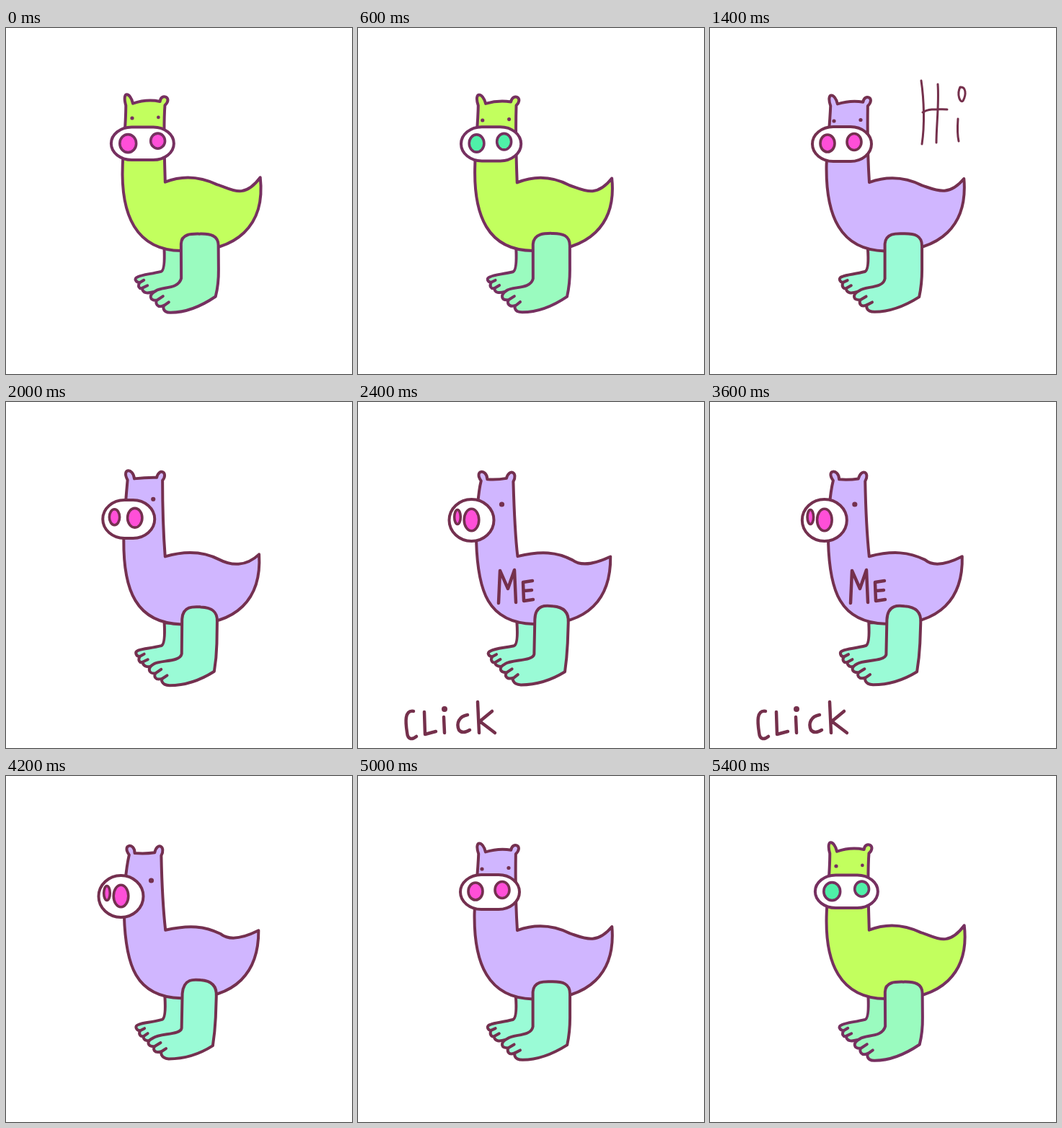
An HTML page that plays this animation: 480 by 480 pixels, repeating every 5.6 s.

```html
<!DOCTYPE html>
<html lang="en">
<head>
<meta charset="utf-8">
<title>Hi, click me</title>
<style>
  html, body { margin: 0; width: 100%; height: 100%; overflow: hidden; background: #fff; }
  svg { display: block; width: 100%; height: 100%; }
  g { fill: none; stroke-linecap: round; stroke-linejoin: round; }
  #bird { stroke-width: 4; }
  .nostril { stroke-width: 3.6; }
  .word { stroke: #75304c; stroke-width: 4.5; }
  .thin { stroke-width: 3; }
  .dot { fill: #75304c; stroke: none; }
</style>
</head>
<body>
<svg viewBox="0 0 480 480">
  <g id="bird">
    <path id="backLeg"/>
    <path id="body"/>
    <path id="frontLeg"/>
    <g id="face">
      <circle class="eye"/><circle class="eye"/>
      <rect id="snout" fill="#fff"/>
      <ellipse class="nostril"/><ellipse class="nostril"/>
    </g>
  </g>
  <g class="word thin" id="h" aria-label="H">
    <path d="M293 73C297 100 298 135 294 161M316 78C318 105 314 135 314 159M295 117C304 111 318 113 329 113"/>
  </g>
  <g class="word thin" id="i" aria-label="i">
    <path d="M344 126C343 140 343 148 345 157M347 82C342 92 347 105 351 101C356 92 355 81 347 82"/>
  </g>
  <g class="word" id="click" aria-label="Click">
    <path d="M77 429C64 427 66 445 68 458C69 470 76 468 81 464M92 430L93 461L108 457M119 437L120 459M152 434C140 436 136 446 140 455C144 460 150 458 155 455M166 416L168 459M186 429L169 443L190 459"/>
    <circle class="dot" cx="120" cy="426" r="4"/>
  </g>
  <g class="word" id="me" aria-label="Me">
    <path d="M195 279L197 234L208 259L217 233L219 278M242 248L229 250L230 276L243 274M230 262L241 261"/>
  </g>
</svg>
<script>
const LOOP = 5600, BEAT = 200;
const GREEN_END = 800, GREEN_START = 5200;
const $ = id => document.getElementById(id);

// Each outline as seen facing the viewer and turned to the side.
const BODY = [
  'M167 108C166 135 163 160 162 190C160 260 180 308 243 309C322 312 358 272 352 209C330 236 312 224 294 218C272 207 248 204 221 214C219 180 218 140 219 108C230 97 214 90 212 103Q195 100 177 105C174 90 160 88 167 108Z',
  'M171 109C166 130 164 160 164 193C166 262 180 306 243 308C322 311 351 270 350 214C334 222 312 230 298 219C276 208 254 206 221 214C217 180 216 145 215 110C222 98 210 91 206 106Q193 108 179 107C179 92 160 94 171 109Z'
];
const FRONT_LEG = [
  'M243 348L243 300C244 283 262 285 270 285C284 285 294 288 294 302L294 335Q294 355 290 373Q258 394 228 394C215 394 217 384 219 384L225 380L219 384C208 389 206 380 209 377L217 372L209 377C199 378 196 370 207 364C215 358 240 362 243 348Z',
  'M244 350L245 302C246 280 262 282 270 283C284 284 293 290 292 306L291 335Q290 355 287 374Q258 392 226 392C213 391 214 382 216 382L222 378L216 382C205 386 203 378 206 375L214 370L206 375C196 376 194 368 204 363C213 357 242 360 244 350Z'
];
const BACK_LEG = 'M219 306Q221 336 215 338C200 342 190 342 183 345C177 347 180 353 185 353L191 350L185 353C182 358 185 362 189 361L196 357L189 361C190 368 196 368 204 366C220 362 240 360 243 352L250 330L246 306Z';

const LOOKS = {
  purple: { skin: '#d0b6ff', leg: '#9afbd6', ink: '#74304f' },
  green: { skin: '#c2ff5e', leg: '#9afbbf', ink: '#763060' }
};
const PINK = '#ff4fd8', TEAL = '#4ff0a8';

const WORDS = { h: [1200, 1800], i: [1400, 1800], click: [2200, 4200], me: [2400, 4200] };

const mix = (a, b, k) => a + (b - a) * k;
const ramp = (t, from, to) => Math.min(1, Math.max(0, (t - from) / (to - from)));
const ease = k => k * k * (3 - 2 * k);
const noise = n => { const s = Math.sin(n * 12.9898) * 43758.5453; return s - Math.floor(s) - .5; };

// Blends two outlines; equal coordinates wobble alike, so shared points stay joined.
function outline([a, b], k, seed) {
  const goal = b.match(/[\d.]+/g);
  let n = 0;
  return a.replace(/[\d.]+/g, v => (mix(+v, +goal[n++], k) + noise(+v + seed)).toFixed(2));
}

function set(el, attrs) {
  for (const name in attrs) el.setAttribute(name, attrs[name]);
}

// 0 faces the viewer, 1 looks left, below 0 leans right
function turnAt(t) {
  const lean = t < GREEN_START ? 1 - ramp(t, 0, GREEN_END) : 1;
  return ramp(t, 1600, 2400) - ease(ramp(t, 4200, 5000)) - lean / 4;
}

const eyes = document.querySelectorAll('.eye');
const nostrils = document.querySelectorAll('.nostril');

function drawFace(turn, drift, nod, ink, nose) {
  const m = (a, b) => mix(a, b, turn);
  set($('face'), { transform: `translate(${drift} ${nod})` });
  set($('snout'), { x: m(142, 126.5), y: m(137, 135), width: m(82, 62), height: m(48, 58), rx: m(29, 31), ry: m(24, 29) });
  set(nostrils[0], { cx: m(163, 138), cy: m(160, 159.5), rx: m(10, 4.3), ry: m(12, 10), fill: nose });
  set(nostrils[1], { cx: m(200, 157.5), cy: m(158, 163.5), rx: m(10, 10.3), ry: m(11.5, 15.3), fill: nose });
  set(eyes[0], { cx: m(172, 160), cy: m(129, 145), r: 2.6 });
  set(eyes[1], { cx: m(209, 199.5), cy: m(127.5, 142), r: m(2.6, 3.6) });
  eyes.forEach(eye => set(eye, { fill: ink, stroke: 'none' }));
}

function draw(time) {
  const beat = Math.floor(time / BEAT), t = beat * BEAT;
  const isGreen = t < GREEN_END || t >= GREEN_START;
  const { skin, leg, ink } = isGreen ? LOOKS.green : LOOKS.purple;
  const nose = isGreen && beat % 2 ? TEAL : PINK;

  const turn = turnAt(t), side = Math.max(0, turn);
  const drift = 2 * ramp(t, 2400, 4200) * side;
  const nod = 3 * ramp(t, 3600, 4200) * side;
  const seed = Math.round(turn * 100 + drift * 10);   // lines change only with the pose

  set($('bird'), { stroke: ink });
  set($('backLeg'), { d: outline([BACK_LEG, BACK_LEG], 0, seed), fill: leg, transform: `translate(${side} 0)` });
  set($('body'), { d: outline(BODY, turn, seed), fill: skin });
  set($('frontLeg'), { d: outline(FRONT_LEG, turn, seed), fill: leg });
  drawFace(turn, drift, nod, ink, nose);

  for (const id in WORDS) {
    const [on, off] = WORDS[id];
    $(id).style.display = t >= on && t < off ? '' : 'none';
  }
}

const begin = performance.now();
function tick() {
  draw((performance.now() - begin) % LOOP);
  requestAnimationFrame(tick);
}
tick();
</script>
</body>
</html>
```
